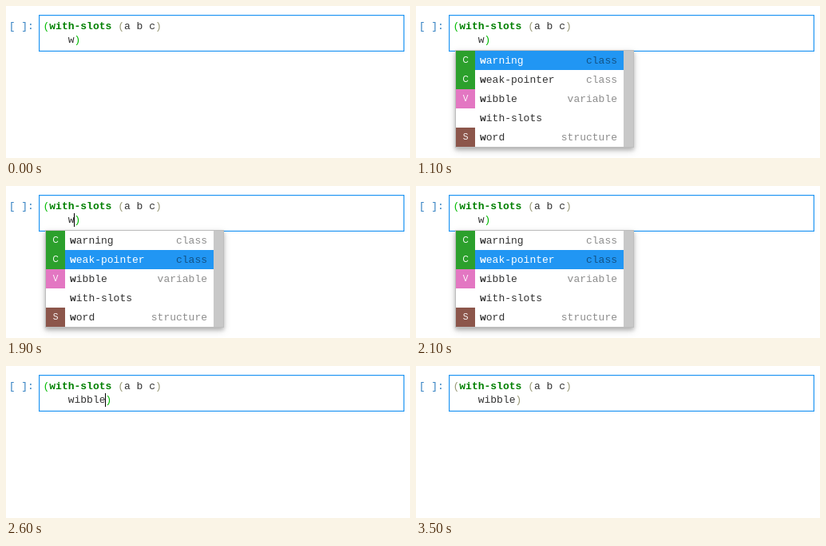
An HTML page for the animation above (3600 ms loop, 506 by 190 pixels).

```html
<!DOCTYPE html>
<html lang="en">
<head>
<meta charset="utf-8">
<title>Code completion</title>
<style>
  html, body { margin: 0; width: 100%; height: 100%; overflow: hidden; background: #fff; }
  svg { display: block; width: 100%; height: 100%; }
  text { font: 13px "Liberation Mono", monospace; white-space: pre; fill: #333; }
  .prompt { fill: #307fc1; }
  .keyword { fill: #008000; font-weight: bold; }
  .paren { fill: #997; }
  .match { fill: #0b0; }
  .prefix { font-weight: bold; }
  .kind { text-anchor: end; fill: #000; fill-opacity: .45; }
  .icon { font: 10px "Liberation Sans", sans-serif; text-anchor: middle; fill: #fff; }
  .active .name { fill: #fff; }
  .popup { filter: drop-shadow(0 3px 2.5px rgba(0,0,0,.2)) drop-shadow(0 3px 4px rgba(0,0,0,.16)); }
</style>
</head>
<body>
<svg id="stage" viewBox="0 0 506 190">
  <rect width="506" height="190" fill="#fff"/>
  <text class="prompt" x="3.7" y="29">[ ]:</text>
  <rect x="41.6" y="11.6" width="456.8" height="44.8" fill="#fff" stroke="#2196f3" stroke-width="1.2"/>
  <text x="46.5" y="29"><tspan class="bracket">(</tspan><tspan class="keyword">with-slots</tspan> <tspan class="paren">(</tspan>a b c<tspan class="paren">)</tspan></text>
  <text x="46.5" y="46">    <tspan id="word">w</tspan><tspan class="bracket">)</tspan></text>
  <rect id="caret" y="34" width="1" height="17"/>
  <g id="popup">
    <rect class="popup" x="49" y="55" width="224" height="122" fill="#bdbdbd"/>
    <rect x="50" y="56" width="222" height="120" fill="#fff"/>
    <g id="rows"></g>
    <rect x="260" y="56" width="12" height="120" fill="#c8c8c8"/>
  </g>
</svg>
<script>
const LOOP = 3600, ROW = 24, CHAR = 7.8;
const NS = "http://www.w3.org/2000/svg";
const items = [
  ["warning", "class", "#2ca02c"],
  ["weak-pointer", "class", "#2ca02c"],
  ["wibble", "variable", "#e377c2"],
  ["with-slots", "", ""],
  ["word", "structure", "#8c564b"]
];
const $ = id => document.getElementById(id);

function add(parent, tag, attrs, text = "") {
  const el = document.createElementNS(NS, tag);
  for (const key in attrs) el.setAttribute(key, attrs[key]);
  el.textContent = text;
  return parent.appendChild(el);
}

const rows = items.map(([name, kind, color], i) => {
  const y = 56 + i * ROW;
  const g = add($("rows"), "g", {});
  const bar = add(g, "rect", { x: 74, y, width: 186, height: ROW, fill: "#2196f3" });
  if (kind) {
    add(g, "rect", { x: 50, y, width: 24, height: ROW, fill: color });
    add(g, "text", { class: "icon", x: 62, y: y + 15 }, kind[0].toUpperCase());
    add(g, "text", { class: "kind", x: 252, y: y + 16 }, kind);
  }
  const label = add(g, "text", { class: "name", x: 80, y: y + 16 });
  add(label, "tspan", { class: "prefix" }, name[0]);
  add(label, "tspan", {}, name.slice(1));
  return { g, bar };
});

const show = (el, on) => el.setAttribute("visibility", on ? "visible" : "hidden");
const within = (t, from, to) => t >= from && t < to;

function draw(t) {
  const open = within(t, 600, 2600);
  const choice = t < 1900 ? 0 : t < 2300 ? 1 : 2;
  const word = t < 2600 ? "w" : "wibble";
  $("word").textContent = word;
  $("caret").setAttribute("x", Math.round(46 + (4 + word.length) * CHAR));
  show($("caret"), within(t, 600, 1100) || within(t, 1600, 2100) || within(t, 2600, 3100));
  $("popup").style.display = open ? "" : "none";
  rows.forEach(({ g, bar }, i) => {
    g.setAttribute("class", i === choice ? "active" : "");
    bar.style.display = i === choice ? "" : "none";
  });
  for (const el of document.querySelectorAll(".bracket"))
    el.setAttribute("class", "bracket " + (t < 3500 ? "match" : "paren"));
}

const start = performance.now();
function tick() {
  draw((performance.now() - start) % LOOP);
  requestAnimationFrame(tick);
}
tick();
</script>
</body>
</html>
```
